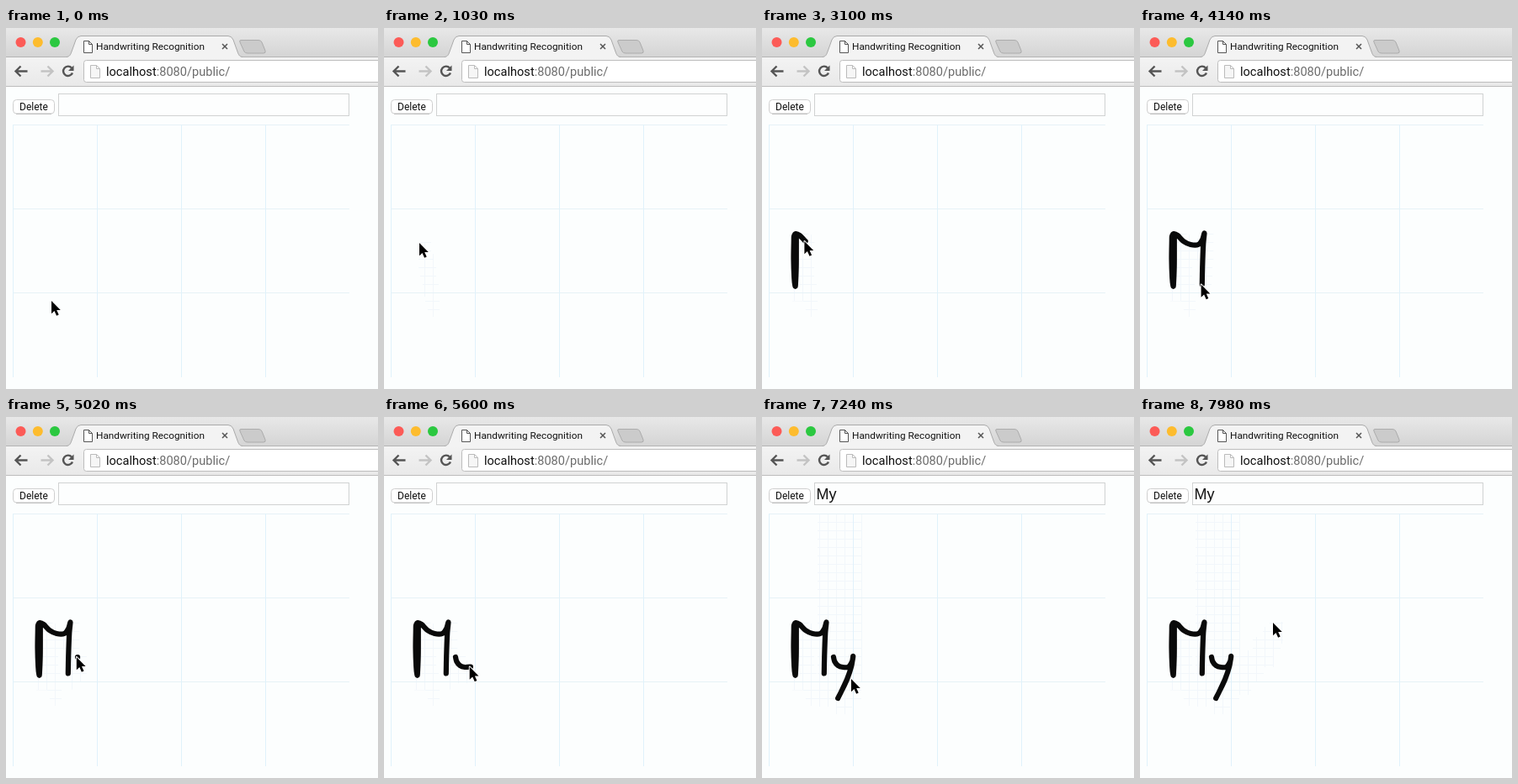
An HTML page for the animation above (8000 ms loop, 442 by 430 pixels).

```html
<!DOCTYPE html>
<html lang="en">
<head>
<meta charset="utf-8">
<title>Handwriting Recognition</title>
<style>
  html, body { margin: 0; width: 100%; height: 100%; overflow: hidden; background: #fcfefe; }
  svg { display: block; width: 442px; height: 430px; }
  text { font-family: Roboto, Inter, sans-serif; fill: #111; white-space: pre; }
  #field { font: 18px "Liberation Sans", Arial, sans-serif; }
  #ink { fill: none; stroke: #0a0a0a; stroke-width: 6.2; stroke-linecap: round; stroke-linejoin: round; }
</style>
</head>
<body>
<svg viewBox="0 0 442 430">
  <defs>
    <linearGradient id="strip" x2="0" y2="1">
      <stop stop-color="#e8e8e8"/><stop offset="1" stop-color="#d4d4d4"/>
    </linearGradient>
    <linearGradient id="bar" x2="0" y2="1">
      <stop stop-color="#f3f3f3"/><stop offset="1" stop-color="#e9e9e9"/>
    </linearGradient>
    <pattern id="fine" x="8" y="115" width="10" height="10" patternUnits="userSpaceOnUse">
      <path d="M.5 0V10M0 .5H10" stroke="#f2f7fb" fill="none"/>
    </pattern>
    <clipPath id="revealed"><path id="reveal"/></clipPath>
  </defs>

  <!-- window chrome -->
  <rect width="442" height="35" fill="url(#strip)"/>
  <rect y="35" width="442" height="34" fill="url(#bar)"/>
  <path d="M0 34.5H73M278 34.5H442" stroke="#b4b4b4"/>
  <path d="M0 69.5H442" stroke="#bcbcbc"/>
  <circle cx="17.5" cy="17" r="6" fill="#fc5b57"/>
  <circle cx="37.8" cy="17" r="6" fill="#fdbc2e"/>
  <circle cx="58" cy="17" r="6" fill="#2bc840"/>
  <path d="M72 35C76 34 77 31 78 28L83 14Q85 9.5 89 9.5H264Q268 9.5 270 14L275 28C276 31 277 34 281 35Z" fill="#f3f3f3"/>
  <path d="M72 34.5C76 34 77 31 78 28L83 14Q85 9.5 89 9.5H264Q268 9.5 270 14L275 28C276 31 277 34 281 34.5" fill="none" stroke="#aaa"/>
  <path d="M279 14.500H300Q303 14.500 304 17L308 27Q309 30 306 30H287Q284 30 283 28L278 17Q277 14.500 279 14.500Z" fill="#cbcbcb" stroke="#acacac"/>
  <path d="M92.500 15.500H98.500L102.500 19.500V29.500H92.500ZM98.500 15.500V19.500H102.500" fill="#fff" stroke="#555"/>
  <text x="107" y="26" font-size="11.8">Handwriting Recognition</text>
  <path d="M257 19L263 25M263 19L257 25" stroke="#555" stroke-width="1.5"/>

  <!-- toolbar -->
  <g fill="none" stroke-width="2.4">
    <path id="back" d="M25.500 51.500H11.500M17.500 45.500L11.500 51.500L17.500 57.500" stroke="#555"/>
    <path d="M41.500 51.500H55.500M49.500 45.500L55.500 51.500L49.500 57.500" stroke="#c3c3c3"/>
    <path d="M78 47.500A5.700 5.700 0 1 0 79 53.500" stroke="#555"/>
  </g>
  <path d="M80.500 44.500V51H74Z" fill="#555"/>
  <rect x="92.500" y="38.500" width="360" height="26" rx="3" fill="#fff" stroke="#bdbdbd"/>
  <path d="M100.500 44.500H107.500L111.500 48.500V59.500H100.500ZM107.500 44.500V48.500H111.500" fill="#f6f6f6" stroke="#bbb"/>
  <text x="119" y="57" font-size="14.6">localhost<tspan fill="#6c6c6c">:8080/public/</tspan></text>

  <!-- page -->
  <rect y="70" width="442" height="360" fill="#fcfefe"/>
  <rect x="8.500" y="85.500" width="49" height="16.500" rx="4" fill="#fff" stroke="#cfcfcf"/>
  <path d="M12 102.300H54" stroke="#b9b9b9"/>
  <text x="16" y="98" font-size="12">Delete</text>
  <rect x="62.500" y="78.500" width="345" height="26" fill="#fdfefe" stroke="#d0d2d2"/>
  <text id="field" x="64.500" y="98"></text>
  <rect x="8" y="115" width="400" height="300" fill="url(#fine)" clip-path="url(#revealed)"/>
  <path d="M8 115.500H408M8 215.500H408M8 315.500H408" stroke="#e6f2f7"/>
  <path d="M8.500 115V416M108.500 115V416M208.500 115V416M308.500 115V416" stroke="#e0f2fb"/>
  <path id="ink"/>
  <g id="cursor">
    <path d="M0 0V15.200L3.500 12L6.100 17.800L8.700 16.600L6.200 11H10.800Z" fill="#000" stroke="#fff" stroke-width="1.800" stroke-linejoin="round" paint-order="stroke"/>
  </g>
</svg>
<script>
const LOOP = 8000;
const $ = id => document.getElementById(id);

// start, end, index of the first inked point (-1: pen up), cursor positions
const moves = [
  [0, 0, -1, "54,325"],
  [300, 1330, -1, "54,323 53,314 50,301 47,286 44,270 42,256 40,247 39,245"],
  [1480, 2510, 0, "39.6,247 39.6,262 39.5,284 38.6,306 38,306.500 37,297 36.300,275 36.600,254"],
  [2660, 3690, 0, "36.800,248 39,245 43.500,247 50.400,254 59,258 68,258 73,252 75.300,244.500"],
  [3840, 4140, 0, "74,258 73,285 72.600,305.500"],
  [4580, 5600, 3, "73,304 76,297 81,289 83.800,286 85,291 89,296 95,298 101.700,297.500"],
  [5750, 6500, 0, "106,291 107,285 105,297 100,312 94,325 89,335"],
  [6940, 7980, -1, "90,334 95,326 106,312 120,296 135,279 147,263 155,251 158,245"]
];
const fieldText = t => t >= 7230 ? "My" : t >= 5900 ? "M" : "";

// Catmull-Rom curve through the inked points
function curve(pts) {
  let d = `M${pts[0]}`;
  if (pts.length < 2) return d + "h.1";
  for (let i = 0; i < pts.length - 1; i++) {
    const a = pts[i - 1] || pts[i], b = pts[i], c = pts[i + 1], e = pts[i + 2] || c;
    const near = [0, 1].map(k => b[k] + (c[k] - a[k]) / 8);
    const far = [0, 1].map(k => c[k] - (e[k] - b[k]) / 8);
    d += `C${near} ${far} ${c}`;
  }
  return d;
}

function buildSteps() {
  const steps = [], strokes = [];
  let reveal = "", last = null, down = false;
  for (const [start, end, inkFrom, list] of moves) {
    const pts = list.split(" ").map(p => p.split(",").map(Number));
    pts.forEach(([x, y], i) => {
      const t = Math.floor((start + (end - start) * i / Math.max(1, pts.length - 1)) / 10) * 10;
      const text = fieldText(t), inked = inkFrom >= 0 && i >= inkFrom;
      if (inked) {
        if (!down) strokes.push([]);
        strokes[strokes.length - 1].push([x + 1.2, y]);
      }
      down = inked;
      // the fine grid shows wherever the picture has been repainted
      if (last) {
        const typed = text !== last.text;
        const left = Math.min(x, last.x, typed ? 67 : x) - 1;
        const top = Math.min(y, last.y, typed ? 86 : y) - 1;
        const right = Math.max(x, last.x) + 12, bottom = Math.max(y, last.y) + 19;
        reveal += `M${left} ${top}H${right}V${bottom}H${left}Z`;
      }
      last = { t, x, y, text, reveal, ink: strokes.map(curve).join("") };
      steps.push(last);
    });
  }
  return steps;
}

const steps = buildSteps();
let shown = null;

function render() {
  const t = performance.now() % LOOP;
  const step = steps.findLast(s => s.t <= t);
  if (step !== shown) {
    shown = step;
    $("cursor").setAttribute("transform", `translate(${step.x} ${step.y})`);
    $("ink").setAttribute("d", step.ink);
    $("reveal").setAttribute("d", step.reveal);
    $("field").textContent = step.text;
  }
  requestAnimationFrame(render);
}
render();
</script>
</body>
</html>
```
